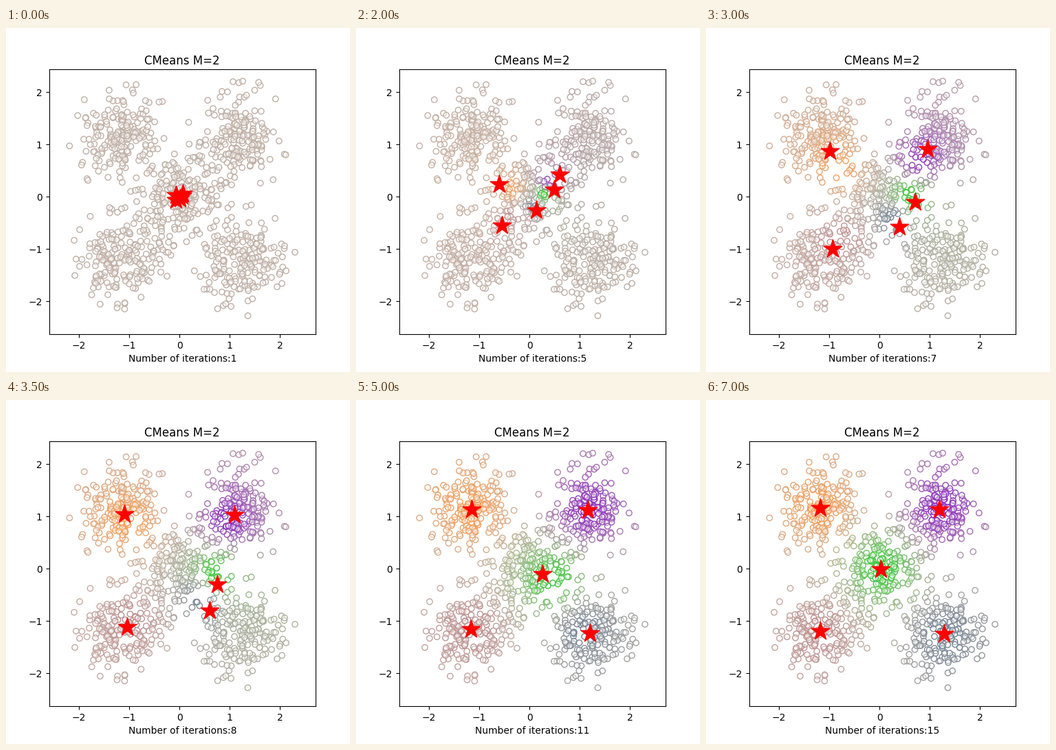
A matplotlib script that plays this animation: 500x500 px, repeating every 7.5 s.

```python
import numpy as np
import matplotlib.pyplot as plt
from matplotlib.animation import FuncAnimation

STEPS = 15
INTERVAL = 500

# orange, rose, green, slate, purple
PALETTE = np.array([(244, 156, 84), (188, 143, 143), (50, 200, 50),
                    (112, 128, 144), (136, 42, 186)]) / 255
PALE = np.array((202, 185, 176)) / 255

# Two poses of the centres, in palette order; the rest follows from rules
DRIFT = np.array([(-0.60, 0.24), (-0.55, -0.55), (0.49, 0.13),
                  (0.13, -0.26), (0.60, 0.43)])
BREAK = np.array([(-0.99, 0.87), (-0.93, -1.00), (0.71, -0.10),
                  (0.39, -0.58), (0.95, 0.91)])
DRIFT_STEP, BREAK_STEP = 5, 7
START_SCALE = 0.12

rng = np.random.default_rng(7)


def blob(cx, cy, sigma=0.42, n=200, reach=2.7):
    """Gaussian cloud without far outliers."""
    z = rng.normal(size=(2 * n, 2))
    z = z[np.hypot(*z.T) < reach][:n]
    return z * sigma + (cx, cy)


points = np.vstack([blob(-1.13, 1.2), blob(1.13, 1.16), blob(-1.13, -1.15),
                    blob(1.2, -1.2), blob(0.03, 0.0)])


def membership(centers):
    d2 = ((points[:, None] - centers) ** 2).sum(axis=2) + 1e-9
    return 1 / d2 / (1 / d2).sum(axis=1, keepdims=True)


def advance(centers):
    """One fuzzy c-means update with m = 2."""
    w = membership(centers) ** 2
    return w.T @ points / w.sum(axis=0)[:, None]


def shade(centers):
    """Strong members take the cluster colour, undecided points stay pale."""
    w = membership(centers) ** 2
    return w @ PALETTE + (1 - w.sum(axis=1, keepdims=True)) * PALE


path = [np.zeros((5, 2))]
for k in range(1, STEPS + 1):
    if k <= DRIFT_STEP:
        path.append(DRIFT * START_SCALE ** ((DRIFT_STEP - k) / (DRIFT_STEP - 1)))
    elif k <= BREAK_STEP:
        t = (k - DRIFT_STEP) / (BREAK_STEP - DRIFT_STEP)
        path.append(DRIFT + (BREAK - DRIFT) * t)
    else:
        path.append(advance(path[-1]))

# Colours come from the centres before the update
colors = [shade(c) for c in path[:-1]]

fig, ax = plt.subplots(figsize=(5, 5), dpi=100)
ax.set_title("CMeans M=2", pad=5.3)
ax.set_xlim(-2.595, 2.706)
ax.set_ylim(-2.631, 2.441)
ax.set_xticks(range(-2, 3))
ax.set_yticks(range(-2, 3))

dots = ax.scatter(*points.T, s=36, facecolors=(1, 1, 1, 0.4),
                  edgecolors=colors[0], linewidths=1)
stars = ax.scatter(*path[1].T, s=400, c="red", marker="*", zorder=3)
label = ax.set_xlabel("Number of iterations:1")


def update(i):
    dots.set_edgecolor(colors[i])
    stars.set_offsets(path[i + 1])
    label.set_text(f"Number of iterations:{i + 1}")
    return dots, stars, label


anim = FuncAnimation(fig, update, frames=STEPS, interval=INTERVAL,
                     repeat=True, repeat_delay=0, blit=False)
plt.show()
```
